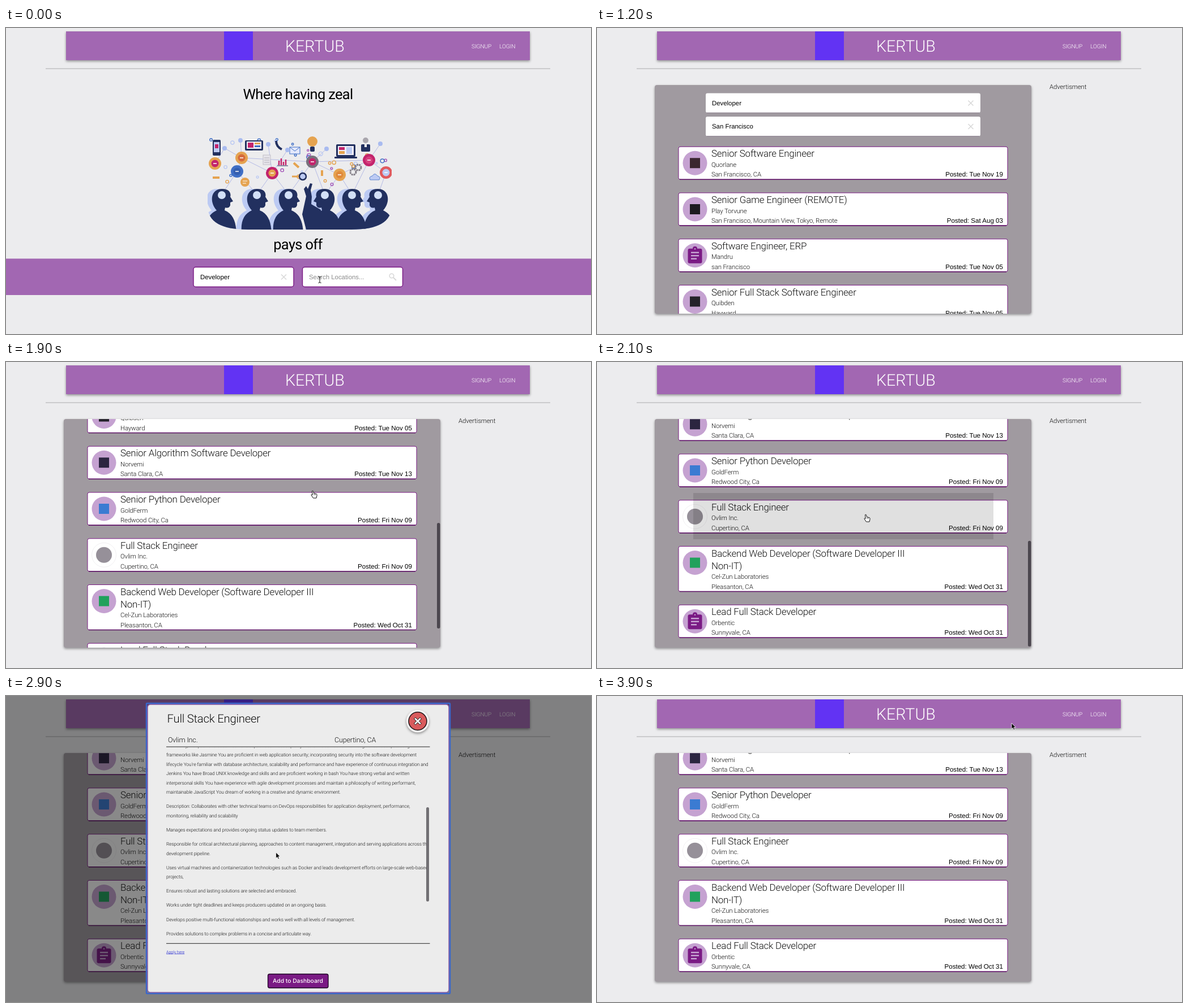
Write an HTML page that moves like this. It is 1033 px wide and 542 px high and loops after 4000 ms.

```html
<!DOCTYPE html>
<html lang="en">
<head>
<meta charset="utf-8">
<title>Job search</title>
<style>
  html, body { margin: 0; width: 100%; height: 100%; overflow: hidden; background: #ececee; }
  svg { display: block; width: 1033px; height: 542px; }
  text { font: 300 12px Roboto, sans-serif; letter-spacing: -.011em; text-rendering: geometricPrecision; fill: #111; }
  .sans { font-family: "Liberation Sans", Arial, sans-serif; font-weight: 400; letter-spacing: 0; fill: #000; }
  .hint { fill: #8c8c8c; }
  .nav { fill: #fff; }
  .brand { letter-spacing: 0; fill: #fff; }
  .slogan { font-weight: 400; letter-spacing: -.024em; fill: #000; }
  .button { font-family: Inter, sans-serif; font-weight: 500; letter-spacing: 0; fill: #fff; }
  .link { fill: #1a1fd0; text-decoration: underline; }
  .end { text-anchor: end; }
  .mid { text-anchor: middle; }
  .shadow { filter: drop-shadow(0 2px 2px rgba(0, 0, 0, .4)); }
</style>
</head>
<body>
<svg id="stage" viewBox="0 0 1033 542"></svg>
<script>
const NAVY = '#22305f', PALE = '#bccaf3', PLUM = '#7a1a84', LILAC = '#c5a2d1', PURPLE = '#a267b2';
const ORANGE = '#e5a350', PINK = '#c3246c', BLUE = '#3f6fc6', GRAY = '#969099';

const rect = (x, y, w, h, fill, more = '') =>
  `<rect x="${x}" y="${y}" width="${w}" height="${h}" fill="${fill}" ${more}/>`;
const circle = (x, y, r, fill, more = '') => `<circle cx="${x}" cy="${y}" r="${r}" fill="${fill}" ${more}/>`;
const path = (d, fill, more = '') => `<path d="${d}" fill="${fill}" ${more}/>`;
const line = (d, stroke, width = 1, more = '') => path(d, 'none', `stroke="${stroke}" stroke-width="${width}" ${more}`);
const text = (x, y, size, words, cls = '', more = '') =>
  `<text x="${x}" y="${y}" style="font-size:${size}px" class="${cls}" ${more}>${words}</text>`;
const group = (id, body) => `<g id="${id}">${body}</g>`;
const cross = (x, y, r, color = '#d8d8d8', width = 1.5) =>
  line(`M${x - r} ${y - r}l${2 * r} ${2 * r}m0 ${-2 * r}l${-2 * r} ${2 * r}`, color, width);

function random(seed) {
  return () => (seed = seed * 16807 % 2147483647) / 2147483647;
}

// ---------- header ----------
const header =
  rect(106, 6, 819, 51, PURPLE, 'class="shadow"') +
  rect(385, 6, 51, 51, '#6233f3') +
  text(493, 42, 28.6, 'KERTUB', 'brand') +
  text(822, 35.5, 10.2, 'SIGNUP', 'nav') + text(871, 35.5, 10.2, 'LOGIN', 'nav') +
  line('M70 72H961', '#a9a9ab');

// ---------- home ----------
function person(x, flip) {
  const d = 'M-27 64C-29 42-22 30-9 24C-22 10-20-13-1-14C13-15 17-7 15 0l5 8-5 2v5q-2 6-9 4l-1 5C20 30 25 44 26 64Z';
  const body = fill => path(d, fill, `transform="scale(${flip} 1)"`);
  return [
    `<g transform="translate(${x - 9} 299)">${body(PALE)}</g>`,
    `<g transform="translate(${x} 299)">${body(NAVY)}${circle(0, -3, 7, '#d3e0f7')}</g>`
  ];
}

function illustration() {
  const people = [[381, 1], [443, 1], [499, 1], [563, -1], [611, 1], [657, -1]].map(p => person(...p));
  const hubs = [
    [369, 240, ORANGE, PINK], [416, 230, ORANGE, '#d56a3c'], [408, 254, BLUE, '#355fb0'], [470, 257, PINK, ORANGE],
    [541, 237, '#77727d', PINK], [589, 260, ORANGE, '#e08a3c'], [641, 234, PINK, '#d6417f'], [671, 256, '#e0595d', PALE]
  ];
  const dots = [[414, 199], [386, 213], [463, 206], [497, 216], [566, 214], [661, 205]];
  const links = 'M381 295L408 254L416 230L414 199M369 240L386 213L416 230L470 257L443 295L408 254M470 257L499 295' +
    'L541 237L566 214M416 230L541 237L641 234L661 205M463 206L470 257L497 216M541 237L563 295L589 260L641 234' +
    'L671 256L657 295M589 260L611 295L641 234M589 260L541 237';
  const rnd = random(23);
  let specks = '';
  for (let i = 0; i < 34; i++) {
    const x = 362 + rnd() * 312, y = 196 + rnd() * 82;
    specks += circle(x, y, 1.5 + rnd() * 2, 'none', `stroke="${[BLUE, '#a456b8', PALE, ORANGE][i % 4]}" stroke-width="1.4"`);
  }
  const gear = (x, y) => circle(x, y, 5, 'none', 'stroke="#85818a" stroke-width="3" stroke-dasharray="3 1"');
  const devices =
    rect(365, 198, 14, 28, NAVY, 'rx="2"') + rect(367, 202, 10, 18, PALE) + rect(369, 206, 6, 7, PINK) +
    rect(422, 199, 32, 18, NAVY, 'rx="2"') + rect(425, 201, 26, 13, '#f0eef8') + rect(427, 203, 10, 9, PINK) +
    rect(439, 203, 10, 3, ORANGE) + rect(439, 208, 10, 3, BLUE) +
    rect(583, 206, 34, 22, NAVY, 'rx="2"') + rect(586, 209, 28, 16, '#f0eef8') + rect(588, 211, 10, 5, PINK) +
    rect(588, 218, 10, 5, ORANGE) + rect(601, 211, 10, 12, PALE) + rect(580, 228, 40, 3, NAVY, 'rx="1"') +
    line('M477 200q0 10 10 15', NAVY, 4) +
    rect(501, 211, 18, 12, '#e3e8fb', `stroke="${BLUE}"`) + line('M501 211l9 7 9-7', BLUE) +
    circle(541, 201, 9, ORANGE) + rect(537, 210, 8, 9, NAVY, 'rx="2"') +
    circle(635, 199, 5, '#a9a6ad') + rect(627, 206, 16, 13, NAVY, 'rx="2"') + rect(633, 206, 4, 5, '#fff') +
    rect(454, 225, 13, 17, '#e6e4ea', 'stroke="#c2bfc8"') + line('M456 230h9m-9 4h9m-9 4h9', '#b4b1ba') +
    line('M482 243v-8m4 8v-12m4 12v-6m4 6v-10', PINK, 2.5) + line('M479 244h19', NAVY) +
    line('M508 239l9 8M558 252v10M365 265h12', ORANGE, 4) +
    circle(524, 263, 6, PALE, `stroke="${NAVY}" stroke-width="2.5"`) + line('M505 263h12', ORANGE, 3) +
    circle(422, 273, 8, ORANGE) + line('M418 271h8m-8 4h6', '#fff') + gear(613, 255) + gear(622, 247) +
    path('M643 269q-3-6 4-7q4-7 9 0q6 1 3 7z', PALE, `stroke="${BLUE}" stroke-width=".8"`);
  const arm = path('M523 330L530 298 526 285 530 280 533 285 537 275 541 276 538 287 540 299 539 312 556 322V357H530Z', NAVY);
  return line(links, '#b3b9e4') + specks + devices +
    dots.map(([x, y]) => circle(x, y, 4, '#a9bbf0')).join('') +
    hubs.map(([x, y, outer, inner]) => circle(x, y, 11, outer) + circle(x, y, 6.5, inner) +
      line(`M${x - 3} ${y}h6`, '#fff', 1.5)).join('') +
    people.map(p => p[0]).join('') + people.map(p => p[1]).join('') + arm;
}

const inputBox = x => rect(x, 423.5, 177, 35, '#fff', `rx="4" stroke="${PLUM}" stroke-width="1.4"`);
const home =
  text(515.5, 126, 25.4, 'Where having zeal', 'slogan mid') +
  '<clipPath id="oval"><path d="M356 188H681V315Q681 357 610 357H427Q356 357 356 315Z"/></clipPath>' +
  `<g clip-path="url(#oval)">${illustration()}</g>` +
  text(515.5, 392, 25.4, 'pays off', 'slogan mid') +
  rect(0, 408.5, 1033, 64.5, PURPLE) + inputBox(331) + inputBox(523.5) +
  text(343, 445, 11.4, 'Developer', 'sans') + cross(490.5, 441, 4.5) +
  text(535, 445, 11.4, '', 'sans', 'id="place"') +
  group('lens', circle(681, 439, 3.8, 'none', 'stroke="#d8d8d8" stroke-width="1.6"') + line('M684 442l5 5', '#d8d8d8', 2)) +
  group('clear', cross(683, 441, 4.5));

// ---------- results ----------
const jobs = [
  [['Senior Software Engineer'], 'Quorlane', 'San Francisco, CA', 'Tue Nov 19', '#3b2730'],
  [['Senior Game Engineer (REMOTE)'], 'Play Torvune', 'San Francisco, Mountain View, Tokyo, Remote', 'Sat Aug 03', '#1c1a20'],
  [['Software Engineer, ERP'], 'Mandru', 'san Francisco', 'Tue Nov 05'],
  [['Senior Full Stack Software Engineer'], 'Quibden', 'Hayward', 'Tue Nov 05', '#24222a'],
  [['Senior Algorithm Software Developer'], 'Norvemi', 'Santa Clara, CA', 'Tue Nov 13', '#2b2540'],
  [['Senior Python Developer'], 'GoldFerm', 'Redwood City, Ca', 'Fri Nov 09', '#3b7bd2'],
  [['Full Stack Engineer'], 'Ovlim Inc.', 'Cupertino, CA', 'Fri Nov 09', GRAY],
  [['Backend Web Developer (Software Developer III', 'Non-IT)'], 'Cel-Zun Laboratories', 'Pleasanton, CA', 'Wed Oct 31', '#20a15c'],
  [['Lead Full Stack Developer'], 'Orbentic', 'Sunnyvale, CA', 'Wed Oct 31']
];

function badge(y, color) {
  if (color === GRAY) return circle(173, y, 21.5, '#fff', 'stroke="#f1eff2"') + circle(173, y, 14, color);
  const mark = color
    ? rect(164, y - 9, 18, 18, color)
    : rect(160.5, y - 12, 25, 26, PLUM, 'rx="3"') + circle(173, y - 12, 4, PLUM) + circle(173, y - 11.5, 1.2, LILAC) +
      line(`M166 ${y - 5}h14m-14 5.5h14m-14 5.5h10`, LILAC, 2.5);
  return circle(173, y, 21.5, LILAC) + mark;
}

function cardList() {
  let y = 210.25;
  return jobs.map(([title, company, city, date, color]) => {
    const extra = (title.length - 1) * 22;
    const card = rect(144, y, 581, 58 + extra, '#fff', `rx="3" stroke="${PLUM}"`) +
      line(`M146 ${y + 58 + extra}H723`, '#5c1064', 1.5) + badge(y + 29, color) +
      title.map((row, i) => text(202, y + 18 + i * 22, 16.9, row)).join('') +
      text(202, y + 35.5 + extra, 11.4, company) + text(202, y + 53 + extra, 11.4, city) +
      text(717, y + 53 + extra, 11.6, 'Posted: ' + date, 'sans end');
    y += 81.75 + extra;
    return card;
  }).join('');
}

const field = (y, words) =>
  rect(192, y, 485, 34.5, '#fff', 'rx="3"') + line(`M194 ${y + 34.7}H675`, '#8b7f8e') +
  text(203, y + 21, 11.4, words, 'sans') + cross(660, y + 17.5, 4.5);

const results =
  rect(102, 101, 665, 405, '#a09aa0', 'rx="4" class="shadow"') +
  '<clipPath id="panel"><rect x="102" y="101" width="665" height="405" rx="4"/></clipPath>' +
  '<g clip-path="url(#panel)">' +
  group('list', field(115.5, 'Developer') + field(157, 'San Francisco') +
    group('cards', rect(131, 198, 607, 82, '#000', 'id="hover" opacity=".08"') + cardList() +
      rect(170, 688, 530, 82, '#000', 'id="press" opacity=".12"'))) +
  '</g>' +
  rect(761, 103, 5.5, 187, '#4b464e', 'rx="2.7" id="bar"') +
  text(799, 108, 11.4, 'Advertisment');

// ---------- job dialog ----------
const paragraphs = [
  `DESCRIPTION: Changing the world is all in a day's work at Ovlim. If you love innovation, here's your chance to make a career of it.
You'll work hard. But the job comes with more than a few perks.`,
  'Job Summary:',
  `Promul is Ovlim’s Global Marketing Communications group. We lead all of Ovlim’s advertising and marketing to ensure the flawless
development and execution of world class communications.
<tspan class="link">http://ovlim.com</tspan> is a critical part of Ovlim’s product marketing strategy and a showcase for internet standards and innovation. In
the role of Full Stack Engineer, you build the development, testing and content integration pipeline for the platform. We expect you
to grow developer productivity, enable continuous deployment, flawless content editing and minimize QA lifecycles.`,
  `Key Qualifications: Strong JavaScript/Node.js skills, with experience developing web applications and a real passion for learning
more. You have an understanding of npm, and experience with publishing modules Experience with web packaging tools like
browserify, webpack and babel You have capabilities in code quality linters like eslint and knowledge of JavaScript testing
frameworks like Jasmine You are proficient in web application security; incorporating security into the software development
lifecycle You're familiar with database architecture, scalability and performance and have experience of continuous integration and
Jenkins You have Broad UNIX knowledge and skills and are proficient working in bash You have strong verbal and written
interpersonal skills You have experience with agile development processes and maintain a philosophy of writing performant,
maintainable JavaScript You dream of working in a creative and dynamic environment.`,
  `Description: Collaborates with other technical teams on DevOps responsibilities for application deployment, performance,
monitoring, reliability and scalability`,
  'Manages expectations and provides ongoing status updates to team members.',
  `Responsible for critical architectural planning, approaches to content management, integration and serving applications across the
development pipeline.`,
  `Uses virtual machines and containerization technologies such as Docker and leads development efforts on large-scale web-based
projects,`,
  'Ensures robust and lasting solutions are selected and embraced.',
  'Works under tight deadlines and keeps producers updated on an ongoing basis.',
  'Develops positive multi-functional relationships and works well with all levels of management.',
  'Provides solutions to complex problems in a concise and articulate way.',
  "Seen as the 'go to",
  `Ovlim is an Equal Opportunity Employer that is committed to inclusion and diversity. We also take affirmative action to offer
employment and advancement opportunities to all applicants, including minorities, women, protected veterans, and individuals
with disabilities. Ovlim will not discriminate or retaliate against applicants who inquire about, disclose, or discuss their
compensation or that of other applicants.`
];

function article() {
  let y = 110, out = '';
  for (const paragraph of paragraphs) {
    for (const row of paragraph.split('\n')) {
      out += text(283, y, 8.4, row);
      y += 16.5;
    }
    y += 8.6;
  }
  return out;
}

const modal =
  rect(0, 0, 1033, 542, '#0a0a0a', 'opacity=".48"') +
  rect(248, 13, 536, 514, 'none', 'rx="1" stroke="#3a66cc" stroke-width="2.5"') +
  rect(250, 15, 532, 510, '#ececec', 'rx="5" stroke="#8a62ac" stroke-width="1.5"') +
  text(284.5, 47, 20.3, 'Full Stack Engineer') +
  text(286, 81.5, 12.5, 'Ovlim Inc.') + text(580, 81.5, 12.5, 'Cupertino, CA') +
  circle(727, 44.5, 20, '#f6f4f4', 'class="shadow"') +
  circle(727, 44.5, 16, '#d95b5d', 'stroke="#1c1416" stroke-width="1.5"') +
  cross(727, 44.5, 5.5, '#222', 4.5) + cross(727, 44.5, 5, '#fff', 2.5) +
  '<clipPath id="view"><rect x="283" y="91" width="466" height="339"/></clipPath>' +
  `<g clip-path="url(#view)">${group('article', article())}</g>` +
  line('M283 90H748.5M283 438.3H748.5', '#222') +
  rect(742, 252 - 159, 5, 167, '#727074', 'rx="2.5" id="thumb"') +
  text(283, 455.5, 7.2, 'Apply here', 'link') +
  rect(462.5, 492.5, 106.5, 24.5, PLUM, 'rx="3" stroke="#1f0524" stroke-width="1.3"') +
  text(515.5, 508.3, 10.3, 'Add to Dashboard', 'button mid');

// ---------- pointers ----------
const pointers =
  group('ibeam', line('M-2.5-5.5Q0-5.5 0-4V4Q0 5.5 2.5 5.5M2.5-5.5Q0-5.5 0-4M0 4Q0 5.5-2.5 5.5', '#111')) +
  group('arrow', path('M0 0V10.5L2.4 8.3L4 12L5.8 11.2L4.2 7.6H7.4Z', '#000', 'stroke="#fff" stroke-width=".8"')) +
  group('hand', path('M-2.5-6.5q1.5-1 2 .5l1 3.5 4.5 1.2q1.5.5 1 2.8l-1 4.5H-.5L-4 .8q0-1.6 1.5-1l.8.7Z', '#fff', 'stroke="#111"') +
    line('M1-1.5v2m2-1.5v2', '#111', .7));

const $ = id => document.getElementById(id);
$('stage').innerHTML = header + group('home', home) + group('results', results) + group('modal', modal) + pointers;

const show = (id, visible) => $(id).setAttribute('display', visible ? 'inline' : 'none');
const move = (id, x, y) => $(id).setAttribute('transform', `translate(${x} ${y})`);

// Linear track through [time, value] points.
function track(t, points) {
  const i = points.findIndex(p => p[0] > t);
  if (i === 0) return points[0][1];
  if (i < 0) return points[points.length - 1][1];
  const [t0, a] = points[i - 1], [t1, b] = points[i];
  return a + (b - a) * (t - t0) / (t1 - t0);
}

function pointerKind(t) {
  if (t < 100 || (t >= 2200 && t < 2500)) return 'ibeam';
  if (t >= 1300 && t < 2200) return 'hand';
  return t >= 2500 ? 'arrow' : '';
}

function draw() {
  const t = Math.floor(performance.now() % 4000 / 100) * 100;
  const typed = 'San Francisco'.slice(0, Math.max(0, Math.round((t - 100) / 100 * 2.6)));

  show('home', t < 700);
  $('place').textContent = typed || 'Search Locations...';
  $('place').setAttribute('class', typed ? 'sans' : 'sans hint');
  show('lens', !typed);
  show('clear', typed);

  const scroll = track(t, [[1200, 0], [1500, 139], [1900, 388], [2000, 456]]);
  show('results', t >= 700);
  show('cards', t >= 1100);
  show('hover', t >= 1300 && t < 1700);
  show('press', t >= 2100 && t < 2500);
  show('bar', t >= 1300 && t < 2200);
  move('list', 0, -scroll);
  move('bar', 0, scroll * .469);

  const read = track(t, [[2500, 0], [2700, 90], [3000, 270], [3200, 321]]);
  show('modal', t >= 2200 && t < 3700);
  show('thumb', t > 2500 && t < 3500);
  move('article', 0, -read);
  move('thumb', 0, read * .495);

  const x = track(t, [[0, 554], [1200, 554], [1300, 543], [1900, 543], [2100, 476], [3300, 477], [3600, 727], [3900, 732]]);
  const y = track(t, [[0, 446], [1200, 446], [1300, 235], [1900, 235], [2100, 277], [3300, 277], [3600, 44], [3900, 48]]);
  for (const kind of ['ibeam', 'arrow', 'hand']) {
    show(kind, kind === pointerKind(t));
    move(kind, x, y);
  }
  requestAnimationFrame(draw);
}
draw();
</script>
</body>
</html>
```
